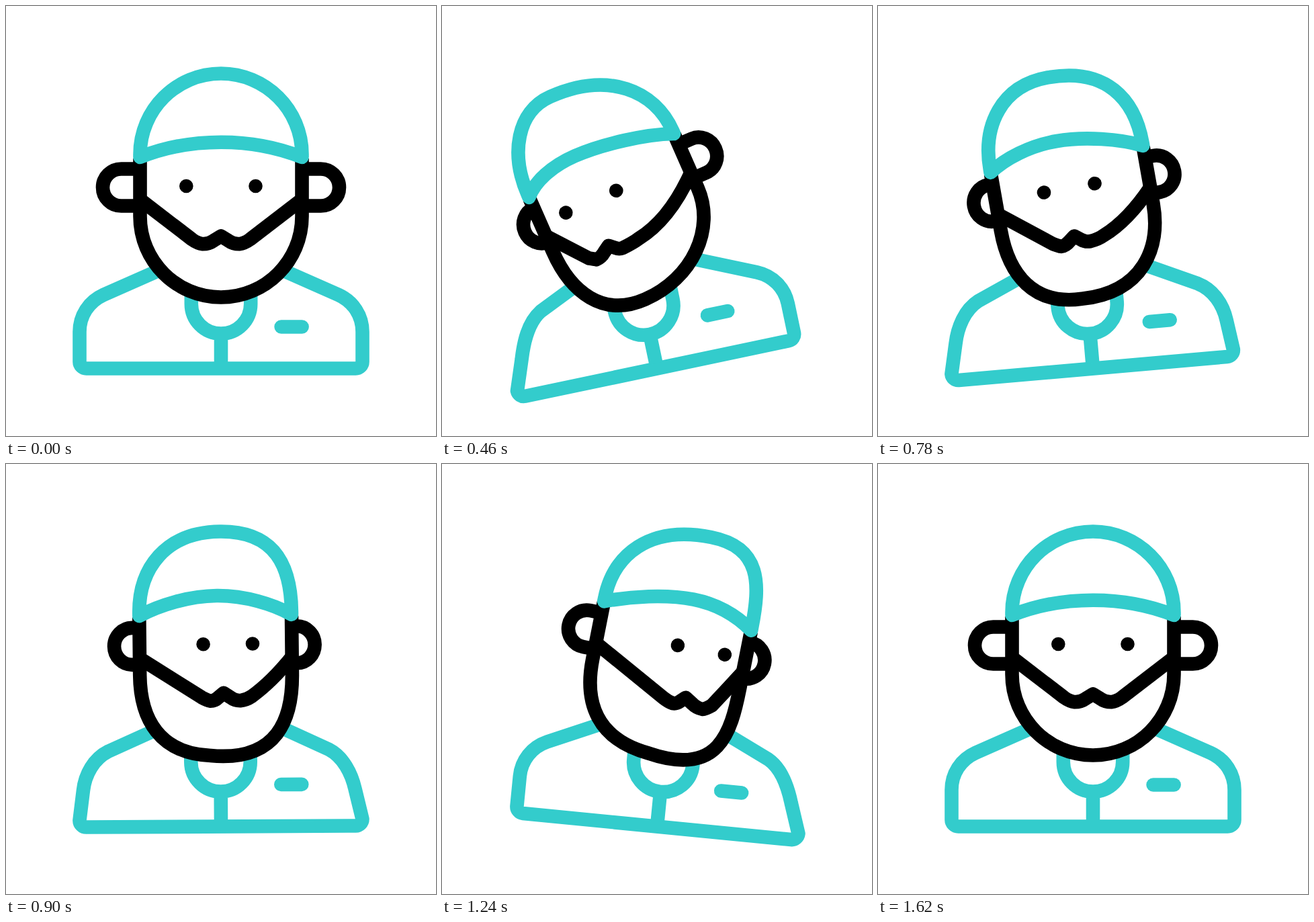
An HTML page that plays this animation: 640x640 px, repeating every 2400 ms.

```html
<!DOCTYPE html>
<html lang="en">
<head>
<meta charset="utf-8">
<style>
  html, body { margin: 0; height: 100%; overflow: hidden; background: #fff; }
  svg { display: block; width: 100vw; height: 100vh; }
  path { fill: none; stroke-width: 20.6; stroke-linejoin: round; }
  .teal path { stroke: #3cc; }
  .black path { stroke: #000; }
  path.solid { fill: #fff; }
  .cap { stroke-linecap: round; }
</style>
</head>
<body>
<svg viewBox="0 0 640 640">
  <g id="body">
    <g class="teal">
      <path id="torso"/>
      <path d="M275.8 420V443.5a44.2 44.2 0 0 0 88.4 0V420M320 487V532"/>
      <path class="cap" d="M409.6 477.5H440.6"/>
    </g>
    <g id="head">
      <g class="black">
        <path id="ears"/>
        <path id="face" class="solid"/>
        <path id="beard"/>
        <circle id="eyeL" cy="268" r="10.3"/>
        <circle id="eyeR" cy="268" r="10.3"/>
      </g>
      <g class="teal"><path id="hat" class="solid"/></g>
    </g>
  </g>
</svg>
<script>
const LOOP = 2400;
const KEYS = [0, 492, 1172, 1610];   // rest, tilt left, tilt right, rest
const $ = id => document.getElementById(id);
const set = (id, name, value) => $(id).setAttribute(name, value);
const path = (id, d) => set(id, 'd', d);

// Weights of the left and right poses at time t
function weights(t) {
  const w = [0, 0, 0, 0];
  const i = KEYS.findLastIndex(k => k <= t);
  if (i === 3) return [0, 0];
  const u = (t - KEYS[i]) / (KEYS[i + 1] - KEYS[i]);
  const eased = u * u * (3 - 2 * u);
  w[i] = 1 - eased;
  w[i + 1] = eased;
  return [w[1], w[2]];
}

function ear(side, root, tip) {
  const k = 0.552;
  const bend = root + (tip - root) * k;
  return `M${side} 242.5H${root}C${bend} 242.5 ${tip} ${270 - 27.5 * k} ${tip} 270` +
    `S${bend} 297.5 ${root} 297.5H${side}`;
}

function draw(t) {
  const [left, right] = weights(t);
  const mix = (rest, a, b) => rest + (a - rest) * left + (b - rest) * right;
  const angle = mix(0, -12, 6);
  set('body', 'transform', `rotate(${angle} 320 539.5)`);
  set('head', 'transform', `rotate(${angle} 320 320) translate(320 0)`);

  const L = 16.3 * left, R = 16.3 * right;
  path('torso',
    `M239 388.5L${145 + 1.44 * L} ${430 - 0.58 * L}` +
    `C${123 + 1.4 * L} ${440 - 0.4 * L} ${109.5 + 1.5 * L} 461 ${109.5 + L} 485` +
    `L109.5 529.5a10 10 0 0 0 10 10H520.5a10 10 0 0 0 10 -10L${530.5 - R} 485` +
    `C${530.5 - 1.5 * R} 461 ${517 - 1.4 * R} ${440 - 0.3 * R} ${495 - 1.3 * R} ${430 - 0.4 * R}L401 388.5`);

  // Head coordinates: x = 0 is the middle of the face
  const xl = mix(-120.5, -117, -121), xr = mix(120.5, 118.5, 101);
  path('ears',
    ear(xl, mix(-148.5, -117, -137.5), mix(-176, -143, -165)) +
    ear(xr, mix(148.5, 139.5, 101), mix(176, 166, 128)));

  const chinX = mix(0, -20, -13), chinY = mix(433.5, 433.5, 434);
  path('face',
    `M${xl} 227V313C${xl} 379.5 ${mix(-66.5, -88, -92)} ${mix(433.5, 433.5, 428)} ${chinX} ${chinY}` +
    `C${mix(66.5, 57, 100)} ${mix(433.5, 433.5, 450)} ${xr} 379.5 ${xr} 313V227`);

  const notch = mix(0, -38, 28), notchY = mix(342.5, 338.5, 342);
  const dipL = mix(-27, -63, 11), dipR = mix(27, -20, 56);
  const bendL = mix(-43, -72, -3.5), bendR = mix(43, 6.6, 68);
  const bendY = mix(347.5, 344, 349), endY = mix(347.5, 347, 346);
  const dipY = mix(354.3, 350, 354);
  const toNotch = (dip, k) => dip + (notch - dip) * k;
  path('beard',
    `M${xl} 288L${bendL} ${bendY}Q${bendL + 8} ${dipY - 1} ${dipL} ${dipY}` +
    `Q${toNotch(dipL, 0.33)} ${dipY} ${toNotch(dipL, 0.59)} ${dipY - 5}L${notch} ${notchY}` +
    `L${toNotch(dipR, 0.59)} ${dipY - 5}Q${toNotch(dipR, 0.33)} ${dipY} ${dipR} ${dipY}` +
    `Q${bendR - 8} ${dipY - 1} ${bendR} ${endY}` +
    `Q${mix(81.7, 61, 85)} ${mix(317.7, 340, 317)} ${xr} 288`);

  set('eyeL', 'cx', mix(-51.7, -76.3, 3));
  set('eyeR', 'cx', mix(51.5, 5.3, 72));

  const top = mix(0, -28, 18), bandX = mix(0, -30, 10), bandY = mix(202.7, 196, 196);
  path('hat',
    `M${xl} 225V221C${xl} 154.5 ${mix(-66.5, -82, -78)} 100.5 ${top} 100.5` +
    `C${mix(66.5, 67, 95)} 100.5 ${xr} 154.5 ${xr} 221V225` +
    `C${mix(83, 80, 80)} ${mix(210, 209, 210)} ${mix(42, 15, 50)} ${bandY} ${bandX} ${bandY}` +
    `C${mix(-42, -68, -32)} ${bandY} ${mix(-83, -100, -83)} ${mix(210, 207, 210)} ${xl} 225Z`);
}

const start = performance.now();
function tick() {
  draw((performance.now() - start) % LOOP);
  requestAnimationFrame(tick);
}
tick();
</script>
</body>
</html>
```
